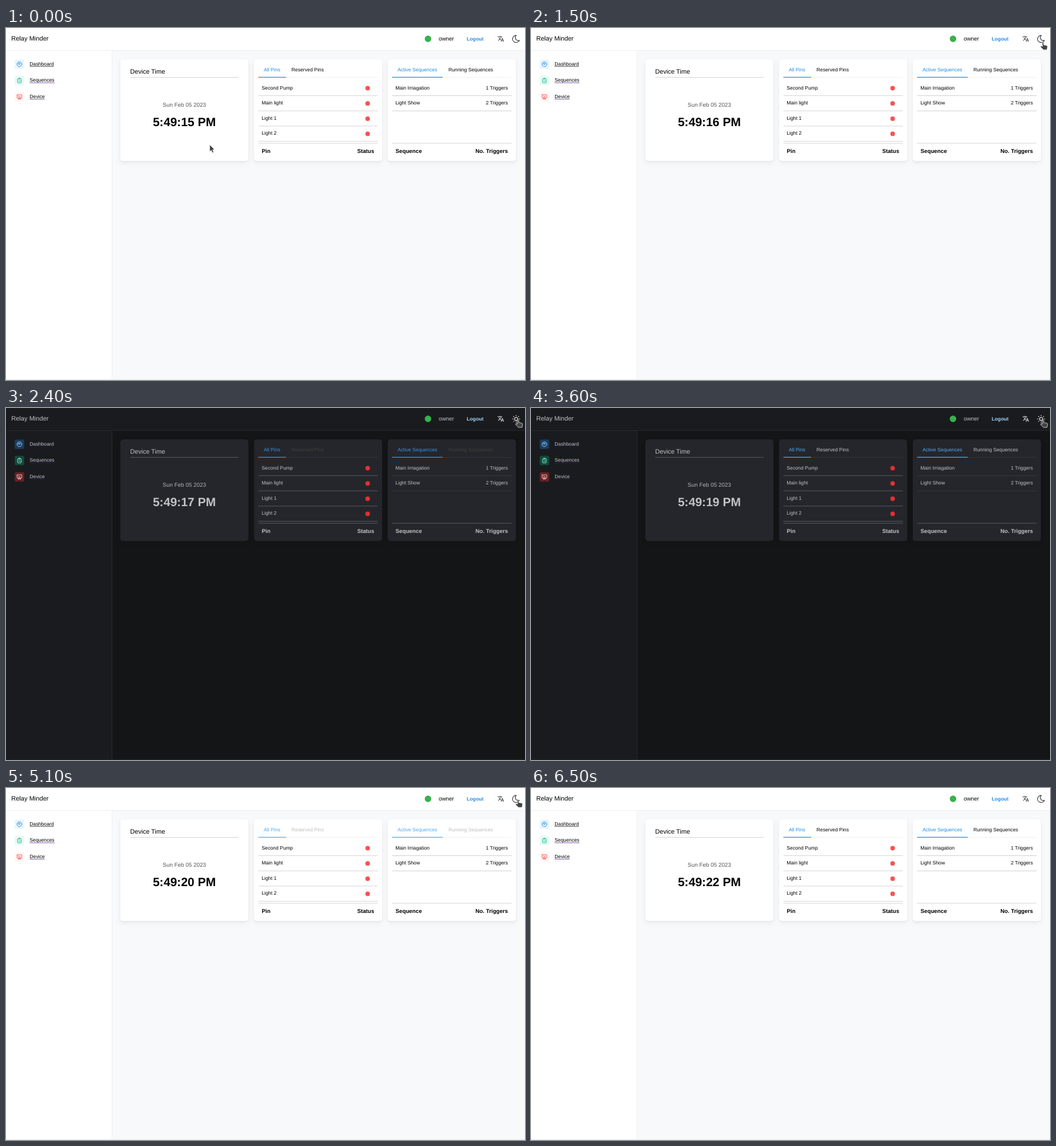
These frames come from a looping animation (908x617 px, 7.2 s). An HTML page:

```html
<!DOCTYPE html>
<html lang="en">
<head>
<meta charset="utf-8">
<title>Dashboard</title>
<style>
html, body { margin: 0; width: 100%; height: 100%; overflow: hidden; }
svg {
  display: block; width: 908px; height: 617px;
  font: 8.68px "Liberation Sans", Arial, sans-serif; text-rendering: geometricPrecision;
  --page: #f8f9fa; --bar: #fff; --card: #fff; --edge: #e9ecef; --foot: #e6e8eb;
  --text: #000; --date: #555; --line: #d0d0d0; --soft: #c9c9c9; --tabline: #e9ecef;
  --link: #228be6; --tool: #444; --dot: #fa5252; --under: #222; --visited: #551a8b;
  --blue: #228be6; --blueBg: #e7f5ff; --teal: #12b886; --tealBg: #e6fcf5;
  --red: #fa5252; --redBg: #fff5f5;
}
svg.dark {
  --page: #141517; --bar: #1a1b1e; --card: #25262b; --edge: #2c2e33; --foot: #222327;
  --text: #c1c2c5; --date: #b2b3b7; --line: #5f6066; --soft: #373a40; --tabline: #373a40;
  --link: #a5d8ff; --tool: #ddd; --dot: #e03131; --under: #1c1c3c; --visited: #35215a;
  --blue: #a5d8ff; --blueBg: #1b3d60; --teal: #96f2d7; --tealBg: #12483b;
  --red: #ffc9c9; --redBg: #642225;
}
text { fill: var(--text); }
.b { font-weight: bold; }
.card { fill: var(--card); filter: drop-shadow(0 1px 1px rgba(0,0,0,.07)) drop-shadow(0 4px 4px rgba(0,0,0,.05)); }
.icon { fill: none; stroke-width: 2; stroke-linecap: round; stroke-linejoin: round; }
#moon, #sun { stroke: var(--tool); stroke-width: 1.9; }
.on { fill: var(--tabOn); }
.off { fill: var(--tabOff); }
#arrow, #hand { fill: #444; stroke: #fff; stroke-width: .7; stroke-linejoin: round; }
</style>
</head>
<body>
<svg id="stage" viewBox="0 0 908 617"></svg>
<script>
const stage = document.getElementById('stage');
const v = name => `var(--${name})`;
const rect = (x, y, w, h, fill, extra = '') =>
  `<rect x="${x}" y="${y}" width="${w}" height="${h}" fill="${fill}" ${extra}/>`;
const line = (x1, x2, y, color, width = .9) =>
  `<path d="M${x1} ${y}H${x2}" stroke="${color}" stroke-width="${width}"/>`;
const dot = (x, y, r, fill) => `<circle cx="${x}" cy="${y}" r="${r}" fill="${fill}"/>`;
const text = (x, y, str, { size = 8.68, cls = '', anchor = 'start', fill = '', id = '' } = {}) =>
  `<text x="${x}" y="${y}" font-size="${size}" class="${cls}" text-anchor="${anchor}" id="${id}"
    ${fill && `style="fill:${fill}"`}>${str}</text>`;

function navItem(y, label, color, under, width, icon) {
  return rect(15.2, y - 8.3, 16.6, 16.6, v(color + 'Bg'), 'rx="2.8"') +
    `<g class="icon" stroke="${v(color)}" transform="translate(23.5 ${y}) scale(.465) translate(-12 -12)">${icon}</g>` +
    text(41.3, y + 2.4, label) + line(41.3, 41.3 + width, y + 4, under, .75);
}

function tabCard(x, tabs, onEnd, offStart, rows, foot) {
  let out = rect(x, 55, 224, 178.3, v('card'), 'rx="5" class="card"') +
    line(x + 7.5, x + 216.5, 86.4, v('tabline'), .8) +
    `<path d="M${x + 7.5} 86.4H${onEnd}" style="stroke:var(--tabOn)" stroke-width="1.4"/>` +
    text(x + 17, 76.2, tabs[0], { cls: 'on' }) + text(offStart, 76.2, tabs[1], { cls: 'off' });
  rows.forEach(([name, count], i) => {
    const y = 107.5 + i * 26.65;
    out += text(x + 13.3, y, name) + line(x + 7.5, x + 216.5, y + 11.1, v(count ? 'soft' : 'line'));
    out += count ? text(x + 210, y, count, { anchor: 'end' }) : dot(x + 198.7, y - 1.9, 4, v('dot'));
  });
  return out + line(x + 7.5, x + 216.5, 202, v('line')) +
    text(x + 13.5, 218.9, foot[0], { size: 9.75, cls: 'b' }) +
    text(x + 210.2, 218.9, foot[1], { size: 9.75, cls: 'b', anchor: 'end' });
}

stage.innerHTML =
  rect(0, 0, 908, 617, v('page')) + rect(0, 0, 185, 617, v('bar')) + rect(185, 39, .8, 577, v('edge')) +
  rect(0, 0, 908, 39, v('bar')) + rect(0, 39, 908, .8, v('edge')) + rect(0, 615.8, 908, 1.2, v('foot')) +
  text(9.2, 22.3, 'Relay Minder', { size: 11.1 }) +
  dot(738.3, 19, 5.7, '#37b24d') + text(757, 22.4, 'owner', { size: 9.9 }) +
  text(806, 21.6, 'Logout', { cls: 'b', fill: v('link') }) +
  `<path fill="${v('tool')}" transform="translate(859.4 12.7) scale(.515)" d="M12.87 15.07l-2.54-2.51.03-.03A17.52 17.52 0 0 0 14.07 6H17V4h-7V2H8v2H1v2h11.17C11.5 7.92 10.44 9.75 9 11.35 8.07 10.32 7.3 9.19 6.69 8h-2c.73 1.63 1.73 3.17 2.98 4.56l-5.09 5.02L4 19l5-5 3.11 3.11.76-2.04zM18.5 10h-2L12 22h2l1.12-3h4.75L21 22h2l-4.5-12zm-2.62 7l1.62-4.33L19.12 17h-3.24z"/>
  <g id="toggle"><g class="icon" transform="translate(892.5 19.2) scale(.69) translate(-12 -12)">
    <path id="moon" d="M12 3h.393a7.5 7.5 0 0 0 7.92 12.446a9 9 0 1 1-8.313-12.454z"/>
    <path id="sun" d="M8 12a4 4 0 1 0 8 0a4 4 0 1 0-8 0M3 12h1m8-9v1m8 8h1m-9 8v1M5.6 5.6l.7.7m12.1-.7l-.7.7m0 11.4l.7.7m-12.1-.7l-.7.7"/>
  </g></g>` +
  navItem(63.5, 'Dashboard', 'blue', v('under'), 42.5,
    '<circle cx="12" cy="12" r="9"/><circle cx="12" cy="12" r="1"/><path d="M13.4 10.6L16 8M7 12a5 5 0 0 1 5-5"/>') +
  navItem(92, 'Sequences', 'teal', v('visited'), 43.5,
    '<path d="M9 5H7a2 2 0 0 0-2 2v12a2 2 0 0 0 2 2h10a2 2 0 0 0 2-2V7a2 2 0 0 0-2-2h-2M9 12h.01M13 12h2M9 16h.01M13 16h2"/><rect x="9" y="3" width="6" height="4" rx="2"/>') +
  navItem(120.8, 'Device', 'red', v('visited'), 26.5,
    '<rect x="3" y="4" width="18" height="12" rx="1"/><path d="M7 20h10M9 16v4M15 16v4M9 12v-4M12 12v-1M15 12v-2"/>') +
  rect(200, 55, 224, 178.3, v('card'), 'rx="5" class="card"') +
  text(217.3, 80.3, 'Device Time', { size: 11.1 }) + line(217.5, 407, 86.5, v('line')) +
  text(312, 137.6, 'Sun Feb 05 2023', { size: 9.9, anchor: 'middle', fill: v('date') }) +
  text(312, 171.8, '', { size: 21.1, cls: 'b', anchor: 'middle', id: 'clock' }) +
  tabCard(434, ['All Pins', 'Reserved Pins'], 490, 499.6,
    [['Second Pump'], ['Main light'], ['Light 1'], ['Light 2']], ['Pin', 'Status']) +
  tabCard(668, ['Active Sequences', 'Running Sequences'], 764, 774,
    [['Main Irriagation', '1 Triggers'], ['Light Show', '2 Triggers']], ['Sequence', 'No. Triggers']) +
  `<path id="arrow" d="M0 0V12.3L2.8 9.9L4.8 14.2L7 13.2L5.1 9L8.4 8.5Z"/>
  <path id="hand" d="M-1.2 1.2Q0-.8 1.4 1.2V5.6L6.8 6.7Q8.4 7.2 8.1 9L7.2 14.2H1L-3.8 9.6Q-4.4 7.8-2.6 7.4L-.6 8.4Z"/>`;

const [toggle, moon, sun, clock, arrow, hand] =
  ['toggle', 'moon', 'sun', 'clock', 'arrow', 'hand'].map(id => document.getElementById(id));

// Pointer stops: time, x, y
const path = [
  [0, 356.3, 204.5], [100, 358, 209], [300, 358, 209], [400, 366, 216], [500, 430, 224],
  [600, 540, 219], [700, 660, 194], [800, 753, 165], [1000, 836, 106], [1100, 867, 74],
  [1200, 880, 52], [1400, 893, 27], [1600, 898, 21], [1700, 898, 21], [2000, 895.6, 19.8],
  [5400, 895.6, 19.8], [5500, 882, 22], [5600, 800, 32], [5800, 505, 40], [6000, 235, 20],
  [6200, 91, 4], [6300, 56, -2], [6400, 40, -30], [7200, 40, -30]
];
const ticks = [600, 1600, 2600, 3600, 4500, 5500, 6500];
const mix = (a, b, p) => `rgb(${a.map((c, i) => Math.round(c + (b[i] - c) * p))})`;

function pointerAt(t) {
  const i = path.findIndex(k => k[0] > t);
  const [a, b] = [path[i - 1], path[i]];
  const p = (t - a[0]) / (b[0] - a[0]);
  return [a[1] + (b[1] - a[1]) * p, a[2] + (b[2] - a[2]) * p];
}

// How far the tab colours have faded to the dark theme
function tabFade(t) {
  if (t < 2400 || t >= 5300) return 0;
  if (t < 2500) return .33;
  if (t < 2600) return .9;
  return t < 5100 ? 1 : t < 5200 ? .98 : .35;
}

function draw(now) {
  const t = Math.floor(now % 7200 / 100) * 100;
  const dark = t >= 2400 && t < 5100;
  const pressed = t >= 2200 && t < 2400 || t === 5000;
  const fade = tabFade(t);
  stage.classList.toggle('dark', dark);
  stage.style.setProperty('--tabOn', mix([34, 139, 230], [77, 171, 247], fade));
  stage.style.setProperty('--tabOff', mix([0, 0, 0], [193, 194, 197], fade));
  moon.style.display = dark ? 'none' : '';
  sun.style.display = dark ? '' : 'none';
  toggle.setAttribute('transform', pressed ? 'translate(.6 .8)' : '');
  clock.textContent = `5:49:${15 + ticks.filter(k => k <= t).length} PM`;

  const [x, y] = pointerAt(t);
  const over = x > 883 && y < 30;
  arrow.style.display = over ? 'none' : '';
  hand.style.display = over ? '' : 'none';
  (over ? hand : arrow).setAttribute('transform', `translate(${x} ${y})`);
}

const start = performance.now();
function frame() {
  draw(performance.now() - start);
  requestAnimationFrame(frame);
}
frame();
</script>
</body>
</html>
```
